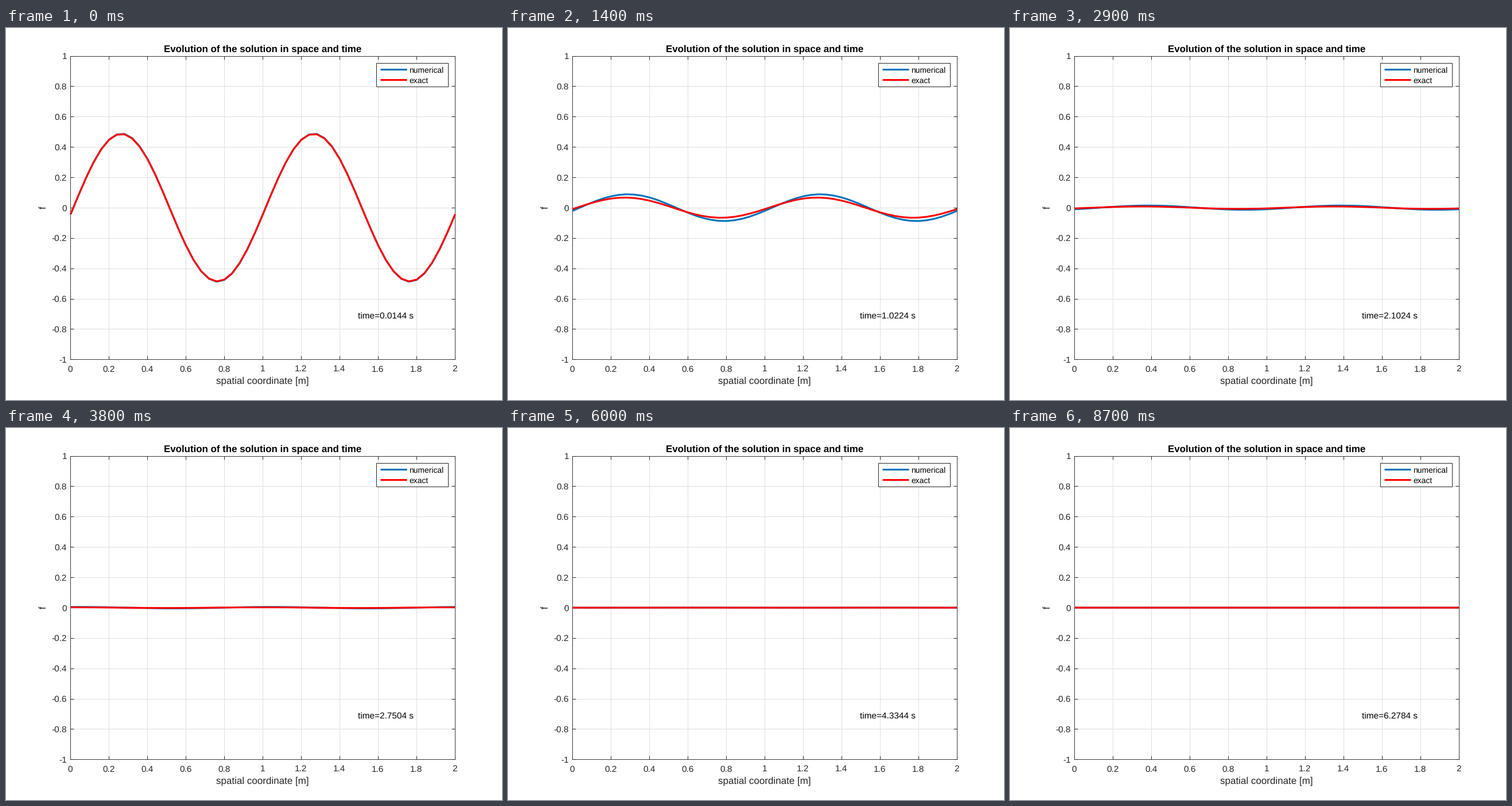
Animation of 864 by 648 pixels, one loop 8.8 s. Source, as a matplotlib script:

```python
import numpy as np
import matplotlib.pyplot as plt
from matplotlib.animation import FuncAnimation
from matplotlib.lines import Line2D
from matplotlib.patches import Rectangle

plt.rcParams.update({
    "font.family": "Liberation Sans",
    "text.hinting": "none",
    "path.simplify": False,
})

W, H, DPI = 864, 648, 72          # at 72 dpi one point is one pixel
FRAMES, INTERVAL = 88, 100
PT = W / 560                      # screen scale of nominal point sizes
INK, BLUE, RED = "#262626", "#0072BD", "#FF0000"

# Plot area in stage pixels
LEFT, TOP, WIDTH, HEIGHT = 112.45, 48.6, 669.9, 528.7

# Advection-diffusion problem, explicit centred scheme on a periodic grid
N, LENGTH, SPEED, DIFF = 51, 2.0, 1.0, 0.05
STEPS_PER_FRAME = 5
h = LENGTH / (N - 1)
dt = 0.9 * h**2 / (2 * DIFF)
x = np.linspace(0, LENGTH, N)
k = 2 * np.pi


def advance(f):
    left, right = np.roll(f, 1), np.roll(f, -1)
    return (f - SPEED * dt / (2 * h) * (right - left)
            + DIFF * dt / h**2 * (right - 2 * f + left))


def solve():
    f = advance(0.5 * np.sin(k * x[:-1]))
    rows = []
    for _ in range(FRAMES):
        rows.append(np.append(f, f[0]))
        for _ in range(STEPS_PER_FRAME):
            f = advance(f)
    return rows


def exact(t):
    return 0.5 * np.exp(-DIFF * k**2 * t) * np.sin(k * (x - SPEED * t))


numerical = solve()

fig = plt.figure(figsize=(W / DPI, H / DPI), dpi=DPI, facecolor="white")
ax = fig.add_axes([LEFT / W, 1 - (TOP + HEIGHT) / H, WIDTH / W, HEIGHT / H])
ax.set(xlim=(0, 2), ylim=(-1, 1),
       xticks=np.arange(11) / 5, yticks=np.arange(-5, 6) / 5)
ax.set_axisbelow(True)
ax.grid(color="#dfdfdf", linewidth=1)
ax.tick_params(direction="in", length=6.2, width=1, color=INK,
               top=True, right=True, labelbottom=False, labelleft=False)
for spine in ax.spines.values():
    spine.set(color=INK, linewidth=0.9)


def label(px, py, text, size=10, color=INK, ha="center", **kw):
    """Text with its baseline at stage pixel (px, py), y downwards."""
    return fig.text(px / W, 1 - py / H, text, fontsize=size * PT,
                    color=color, ha=ha, va="baseline", **kw)


for i in range(11):
    label(LEFT - 0.4 + WIDTH * i / 10, 598.4, f"{i / 5:g}")
    label(106, TOP + HEIGHT * i / 10 + 5.5, f"{(5 - i) / 5:g}", ha="right")

label(447.3, 41.6, "Evolution of the solution in space and time", 10.9,
      "black", weight="bold")
label(447.1, 619.4, "spatial coordinate [m]", 11)
label(69.5, 312.9, "f", 11, rotation=90, rotation_mode="anchor")
clock = label(613.4, 506.4, "", 10, "black", ha="left")

# Legend
fig.add_artist(Rectangle((645, H - 102), 125, 41, transform=None,
                         facecolor="white", edgecolor=INK, linewidth=1))
for py, name, color in ((72.5, "numerical", BLUE), (90.5, "exact", RED)):
    fig.add_artist(Line2D([652.5, 698.5], [H - py] * 2, transform=None,
                          color=color, linewidth=2 * PT, snap=False,
                          solid_capstyle="butt"))
    label(702.5, py + 5.3, name, 9, "black", ha="left")


def curve(color):
    line, = ax.plot(x, 0 * x, color=color, linewidth=2 * PT, zorder=5,
                    clip_on=False, snap=False, solid_capstyle="butt",
                    solid_joinstyle="round")
    return line


num_line, exact_line = curve(BLUE), curve(RED)


def update(i):
    t = dt * (1 + STEPS_PER_FRAME * i)
    num_line.set_ydata(numerical[i])
    exact_line.set_ydata(exact(t))
    clock.set_text(f"time={t:.4f} s")
    return num_line, exact_line, clock


anim = FuncAnimation(fig, update, frames=FRAMES, interval=INTERVAL,
                     init_func=lambda: update(0), repeat=True,
                     repeat_delay=0, blit=False)
plt.show()
```
